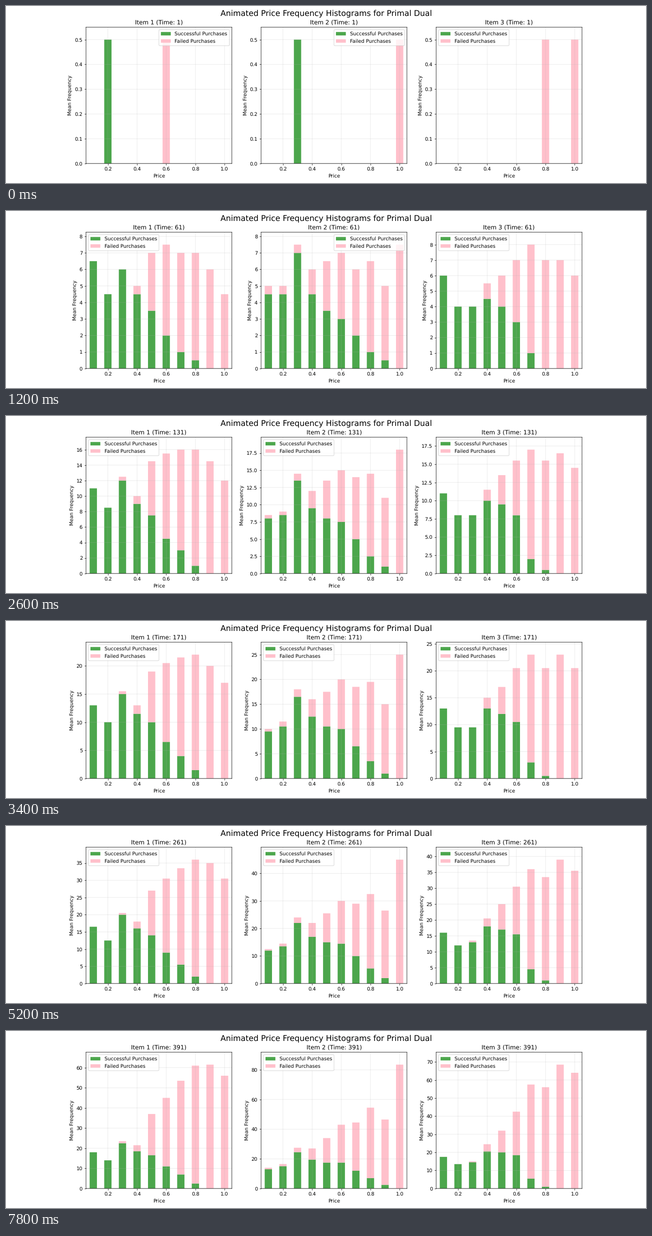
A matplotlib script for the animation above (8000 ms loop, 1280 by 356 pixels).

```python
import numpy as np
import matplotlib.pyplot as plt
from matplotlib.animation import FuncAnimation

W, H = 1280, 356
DPI = W / 18
FRAMES, INTERVAL, STEP = 40, 200, 10
END = 1 + STEP * (FRAMES - 1)

TENTHS = np.arange(1, 11)
PRICES = TENTHS / 10

# Smooth edges and glyphs that may sit between whole pixels.
plt.rcParams.update({"path.snap": False, "text.hinting": "none"})


def first(*tenths):
    """One opening purchase per run, averaged over two runs."""
    return 0.5 * np.isin(TENTHS, tenths)


def low(*values):
    """Final means from the lowest price upwards."""
    return np.pad(values, (0, len(TENTHS) - len(values)))


def high(*values):
    """Final means up to the highest price."""
    return np.pad(values, (len(TENTHS) - len(values), 0))


# Opening and final means: won, then lost.
ITEMS = [
    (first(2), low(18, 14, 22.5, 18.5, 16.5, 11, 7, 2.5),
     first(6), high(1, 3, 20.5, 34, 46.5, 58.5, 61.5, 56)),
    (first(3), low(13, 15, 24.5, 19.5, 17.5, 17.5, 12, 7, 2.5),
     first(10), high(1, 1.5, 3, 7.5, 16.5, 25.5, 32.5, 47.5, 44, 83.5)),
    (first(), low(17.5, 13.5, 14.5, 20.5, 20, 18.5, 5.5, 1),
     first(8, 10), high(0.5, 4, 12, 24, 52, 55, 68.5, 64)),
]


def halves(values):
    return np.round(values * 2) / 2


def heights(won_0, won_1, lost_0, lost_1, t):
    """Wins level off, later for high prices; losses take the rest of the t tries."""
    u = (t - 1) / (END - 1)
    ease = 1 - (1 - u ** (0.8 + 0.8 * PRICES)) ** 2
    won = won_0 * (1 - u) + won_1 * ease
    share = lost_0 * (1 - u) + lost_1 * u ** (0.5 + 0.8 * PRICES)
    lost = share * (t - won.sum()) / share.sum()
    return halves(won), halves(lost)


# The tiny margin keeps the pixel size from being truncated.
fig, axes = plt.subplots(1, 3, figsize=((W + 1e-4) / DPI, (H + 1e-4) / DPI), dpi=DPI)
fig.suptitle("Animated Price Frequency Histograms for Primal Dual", fontsize=16)


def draw_item(ax, number, item, t):
    won, lost = heights(*item, t)
    ax.clear()
    ax.bar(PRICES, won, width=0.05, color="green", alpha=0.7,
           label="Successful Purchases")
    ax.bar(PRICES, lost, width=0.05, bottom=won, color="pink",
           label="Failed Purchases")
    ax.set_xlim(0.05, 1.05)
    ax.set_ylim(0, (won + lost).max() * 1.1)
    ax.set_title(f"Item {number} (Time: {t})")
    ax.set_xlabel("Price")
    ax.set_ylabel("Mean Frequency")
    ax.grid(True, alpha=0.3)
    ax.legend(loc="best")


def update(frame):
    t = 1 + STEP * frame
    for number, (ax, item) in enumerate(zip(axes, ITEMS), 1):
        draw_item(ax, number, item, t)
    return []


anim = FuncAnimation(fig, update, frames=FRAMES, interval=INTERVAL,
                     init_func=lambda: [], repeat=True, repeat_delay=0, blit=False)
plt.show()
```
